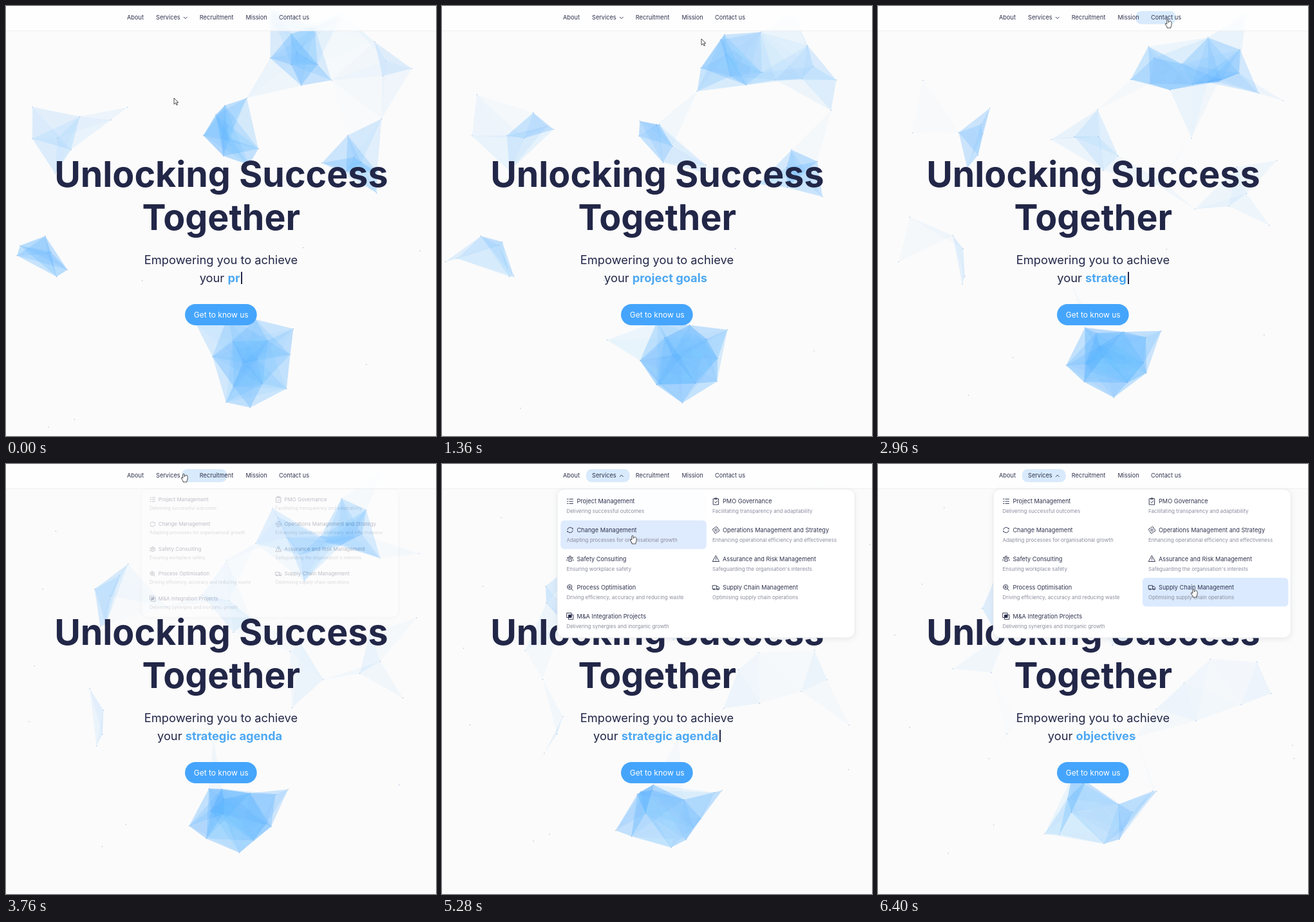
An HTML page with a canvas for the animation above (6.48 s loop, 668 px wide and 668 px high).

```html
<!DOCTYPE html>
<html lang="en">
<head>
<meta charset="utf-8">
<title>Unlocking Success Together</title>
<style>
  html, body { margin: 0; width: 100%; height: 100%; overflow: hidden; background: #fbfbfb; }
  body { position: relative; font-family: Inter, sans-serif; color: #222748; }
  canvas, svg { position: absolute; left: 0; top: 0; width: 668px; height: 668px; }
  header { position: absolute; left: 0; top: 0; width: 668px; height: 38px; background: rgba(255,255,255,.72);
    backdrop-filter: blur(3px); border-bottom: 1px solid #efeff1; }
  .sub { position: absolute; left: 0; top: 379.5px; width: 668px; font-size: 18.3px;
    line-height: 28px; text-align: center; white-space: pre; }
  .sub b { font-weight: 700; color: #4da8f2; }
  #caret { display: inline-block; width: 2.2px; height: 19px; margin-left: 1.8px; vertical-align: -3px; background: #222748; }
  text { fill: #222748; }
  .h { font-size: 55.5px; font-weight: 700; text-anchor: middle; }
  .nav, .title { font-size: 9.2px; fill: #30344f; }
  .desc { font-size: 8.02px; fill: #8b8d9e; }
  .btn { font-size: 12px; fill: #fff; text-anchor: middle; }
  .line { fill: none; stroke: #30344f; stroke-width: .95; stroke-linecap: round; stroke-linejoin: round; }
  #panel { fill: #fff; stroke: #e6e7ea; stroke-width: .8; filter: drop-shadow(0 2px 4px rgba(30,40,80,.08)); }
</style>
</head>
<body>
<canvas id="net" width="668" height="668"></canvas>
<svg viewBox="0 0 668 668">
  <text class="h" x="334.3" y="280.7">Unlocking Success</text>
  <text class="h" x="334.3" y="347.7">Together</text>
  <rect x="278" y="463" width="111.7" height="33" rx="16.5" fill="#45a5fc"/>
  <text class="btn" x="334.2" y="483.8">Get to know us</text>
</svg>
<div class="sub">Empowering you to achieve
your <b id="word"></b><span id="caret"></span></div>
<header></header>
<svg viewBox="0 0 668 668">
  <rect id="pill" y="8" height="20.3" rx="8.5" fill="#d8eafc"/>
  <g id="nav"></g>
  <path id="chevron" class="line" d="M-2.5-1.2L0 1.3 2.5-1.2"/>
  <g id="menu"><rect id="panel" x="179" y="39" width="462.5" height="231" rx="11"/></g>
  <path id="arrow" d="M0 0V9.6L2.3 7.5 4 11 5.5 10.3 3.9 6.9H6.8Z" fill="#fff" stroke="#222" stroke-width=".8"/>
  <path id="hand" d="M-1.2 1Q0-1 1.1 1V4.6Q5-.2 6.2 5.6 6.2 9.6 5 11.2V13H-1V11.2L-3.9 7Q-3.5 4.6-1.2 7Z"
    fill="#fff" stroke="#222" stroke-width=".8"/>
</svg>
<script>
const LOOP = 6480, STEP = 80, SIZE = 668, REACH = 100;
const $ = id => document.getElementById(id);
const clamp = v => Math.max(0, Math.min(1, v));
const smooth = v => v * v * (3 - 2 * v);
const range = n => [...Array(n).keys()];

function add(parent, tag, attrs, text = '') {
  const el = document.createElementNS('http://www.w3.org/2000/svg', tag);
  set(el, attrs);
  el.textContent = text;
  parent.append(el);
  return el;
}
function set(el, attrs) {
  for (const k in attrs) el.setAttribute(k, attrs[k]);
}

// Icon parts on an 11 px grid
const ring = (x, y, r) => `M${x - r} ${y}a${r} ${r} 0 1 1 ${2 * r} 0a${r} ${r} 0 1 1 ${-2 * r} 0`;
const box = (x, y, w, h) => `M${x} ${y}h${w}v${h}h${-w}z`;
const gear = 'M' + range(16).map(i => {
  const r = i % 4 < 2 ? 5 : 3.9, a = i * Math.PI / 8;
  return [5.5 + r * Math.cos(a), 5.5 + r * Math.sin(a)];
}).join('L') + 'z';
const icons = {
  list: [2, 5.5, 9].map(y => `M1 ${y}h1.5M4.5 ${y}H10`).join(''),
  cycle: 'M1.2 4.8A4.4 4.4 0 0 1 9.6 4.2V2.6M9.8 6.2A4.4 4.4 0 0 1 1.4 6.8V8.4',
  team: ring(5.5, 2.6, 1.4) + ring(2.2, 4.2, 1) + ring(8.8, 4.2, 1) + 'M3.3 9V6.5Q5.5 4.5 7.7 6.5V9ZM.6 8.5V6.8M10.4 8.5V6.8',
  zoom: ring(4.8, 4.8, 3.6) + 'M7.4 7.4L10 10M3.2 4.8h3.2M4.8 3.2v3.2',
  merge: box(.6, .6, 7, 7) + box(3.4, 3.4, 7, 7),
  board: box(1.5, 1.4, 8, 9.2) + box(4, .5, 3, 1.7) + 'M3.6 6.4L5 7.8 7.6 4.8',
  gear: gear + ring(5.5, 5.5, 1.7),
  alert: 'M5.5.8L10.5 9.8H.5ZM5.5 4V6.6M5.5 8.2v.1',
  truck: box(.5, 2.5, 6, 5.5) + 'M6.5 4H9L10.6 5.8V8H6.5' + ring(2.5, 8.4, .9) + ring(8.5, 8.4, .9)
};
const items = [
  ['list', 'Project Management', 'Delivering successful outcomes'],
  ['cycle', 'Change Management', 'Adapting processes for organisational growth'],
  ['team', 'Safety Consulting', 'Ensuring workplace safety'],
  ['zoom', 'Process Optimisation', 'Driving efficiency, accuracy and reducing waste'],
  ['merge', 'M&A Integration Projects', 'Delivering synergies and inorganic growth'],
  ['board', 'PMO Governance', 'Facilitating transparency and adaptability'],
  ['gear', 'Operations Management and Strategy', 'Enhancing operational efficiency and effectiveness'],
  ['alert', 'Assurance and Risk Management', "Safeguarding the organisation's interests"],
  ['truck', 'Supply Chain Management', 'Optimising supply chain operations']
];
const ROW = 44.6, LEFT = 184.2, TOP = 43, COL = 226.6;

const rows = items.map(([icon, title, desc], i) => {
  const x = LEFT + (i < 5 ? 0 : COL), y = TOP + ROW * (i % 5), menu = $('menu');
  const back = add(menu, 'rect', { x, y, width: COL, height: ROW, rx: 6, fill: '#dbeafe' });
  add(menu, 'path', { class: 'line', d: icons[icon], transform: `translate(${x + 9.3} ${y + 9.5})` });
  if (icon === 'merge') add(menu, 'path', { d: box(x + 12.7, y + 12.9, 4.2, 4.2), fill: '#222748' });
  add(menu, 'text', { class: 'title', x: x + 25.2, y: y + 18.3 }, title);
  add(menu, 'text', { class: 'desc', x: x + 9.2, y: y + 33.3 }, desc);
  return back;
});

// Label with its left and right edge
const nav = [['About', 188, 214], ['Services', 233, 282.5], ['Recruitment', 300.8, 354], ['Mission', 372.4, 406], ['Contact us', 424, 472]];
for (const [label, x] of nav) add($('nav'), 'text', { class: 'nav', x, y: 21.4 }, label);

// Highlighted nav item: time, index
const stops = [[1900, 3], [2880, 4], [3340, 3], [3500, 2], [3738, 1]];
// Pointer: arrival time, x, y
const pointer = [[0, 261, 143], [1360, 403, 51], [1900, 392, 24], [2960, 450, 21],
  [3760, 276, 15], [4480, 265, 14], [5280, 296, 111], [6200, 490, 194]];
const TRAVEL = 500, OPEN = 3700, FADE = 180;
const words = [['project goals', -80], ['strategic agenda', 2680], ['objectives', 5608]];

// Clusters: x, y, drift x, drift y, radius, members
const flocks = [[390, 548, -4, 0, 80, 13], [452, 72, 2, 9, 52, 7], [80, 205, 11, -9, 62, 6], [65, 385, 15, 0, 48, 4],
  [540, 235, 2, 18, 50, 5], [590, 85, -10, 12, 42, 4], [345, 205, 12, 10, 50, 4]];
const LONERS = 24;
let seed = 11;
const rand = () => (seed = seed * 16807 % 2147483647) / 2147483647;
const jitter = v => (rand() * 2 - 1) * v;

// Members sit on a golden-angle spiral and wander off slowly
const dots = flocks.flatMap(([x, y, vx, vy, radius, n]) => range(n).map(i => {
  const r = radius * Math.sqrt(i / (n - 1)), a = i * 2.4 + x;
  return { x: x + r * Math.cos(a), y: y + r * Math.sin(a), vx: vx + jitter(10), vy: vy + jitter(10) };
})).concat(range(LONERS).map(() => ({ x: rand() * SIZE, y: rand() * SIZE, vx: jitter(30), vy: jitter(30) })));

const ctx = $('net').getContext('2d');
const link = (a, b) => 1 - Math.hypot(a[0] - b[0], a[1] - b[1]) / REACH;

function drawNet(t) {
  const s = t / 1000, pts = dots.map(d => [d.x + d.vx * s, d.y + d.vy * s]), n = pts.length;
  ctx.clearRect(0, 0, SIZE, SIZE);
  for (let i = 0; i < n; i++) for (let j = i + 1; j < n; j++) {
    const ij = link(pts[i], pts[j]);
    if (ij <= 0) continue;
    for (let k = j + 1; k < n; k++) {
      const ik = link(pts[i], pts[k]), jk = link(pts[j], pts[k]);
      if (ik <= 0 || jk <= 0) continue;
      const alpha = .1 * (ij + ik + jk - Math.max(ij, ik, jk));
      ctx.fillStyle = `rgba(70,165,252,${alpha})`;
      ctx.beginPath();
      for (const v of [i, j, k]) ctx.lineTo(...pts[v]);
      ctx.fill();
    }
  }
  ctx.fillStyle = 'rgba(95,150,215,.6)';
  for (const [x, y] of pts) {
    ctx.beginPath();
    ctx.arc(x, y, .75, 0, 7);
    ctx.fill();
  }
}

function drawWord(t) {
  const [word, start] = words.filter(w => w[1] <= t).pop();
  const erase = start + word.length * 40 + 2000;
  const left = word.length - Math.max(0, Math.ceil((t - erase) / 18));
  $('word').textContent = word.slice(0, Math.max(0, Math.min(Math.floor((t - start) / 40), left)));
  $('caret').style.opacity = (t + 200) % 1000 < 500 ? 1 : 0;
}

// The pill chases each stop exponentially
function drawPill(t) {
  let [, x, end] = nav[stops[0][1]];
  for (let i = 1; i < stops.length; i++) {
    const from = nav[stops[i - 1][1]], to = nav[stops[i][1]];
    const p = 1 - Math.exp(-Math.max(0, t - stops[i][0]) / 63);
    x += (to[1] - from[1]) * p;
    end += (to[2] - from[2]) * p;
  }
  set($('pill'), { x: x - 9.2, width: end - x + 18.4, opacity: clamp((t - stops[0][0]) / 150) });
}

function pointerAt(t) {
  let [, x, y] = pointer[0];
  for (let i = 1; i < pointer.length; i++) {
    const p = smooth(clamp((t - pointer[i][0]) / TRAVEL + 1));
    x += (pointer[i][1] - pointer[i - 1][1]) * p;
    y += (pointer[i][2] - pointer[i - 1][2]) * p;
  }
  return [x, y];
}

function rowAt(t) {
  const [x, y] = pointerAt(t);
  return y < TOP || t < OPEN ? -1 : Math.floor((y - TOP) / ROW) + (x < LEFT + COL ? 0 : 5);
}

function drawMenu(t) {
  const p = clamp((t - OPEN) / 250), scale = .84 + .16 * smooth(p);
  set($('menu'), {
    opacity: clamp((t - OPEN) / 200),
    transform: `translate(410 37) scale(${scale}) translate(-410 -37)`
  });
  set($('chevron'), { transform: `translate(278.8 18.4) scale(1 ${1 - 2 * p})` });
  // Averaging the recent hover gives a linear fade
  const recent = range(12).map(k => rowAt(t - k * FADE / 12));
  rows.forEach((row, i) => set(row, { opacity: recent.filter(r => r === i).length / 12 }));
}

function drawPointer(t) {
  const hand = t >= stops[0][0], transform = `translate(${pointerAt(t).join(' ')})`;
  set($('hand'), { transform, opacity: +hand });
  set($('arrow'), { transform, opacity: +!hand });
}

function frame() {
  const t = Math.floor(performance.now() % LOOP / STEP) * STEP;
  for (const draw of [drawNet, drawWord, drawPill, drawMenu, drawPointer]) draw(t);
  requestAnimationFrame(frame);
}
frame();
</script>
</body>
</html>
```
